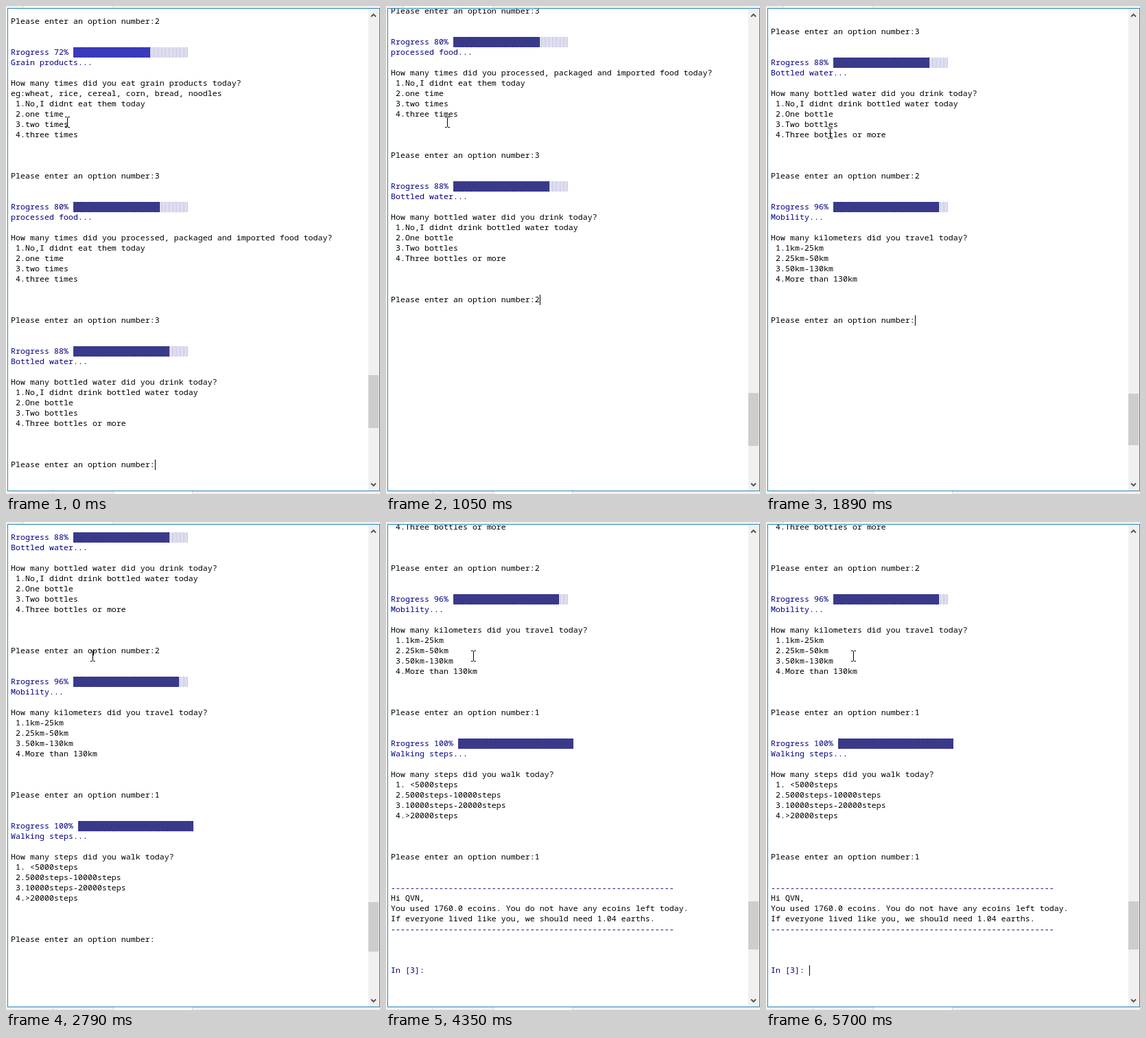
Animation, 545 px wide and 710 px high, one loop 5730 ms. Source, as an HTML page:

```html
<!DOCTYPE html>
<html lang="en">
<head>
<meta charset="utf-8">
<title>Console questionnaire</title>
<style>
@property --scroll { syntax: "<number>"; inherits: true; initial-value: 0; }
@property --total { syntax: "<number>"; inherits: true; initial-value: 6075; }
@property --stage { syntax: "<number>"; inherits: true; initial-value: 0; }
@property --line { syntax: "<number>"; inherits: true; initial-value: 43; }
@property --col { syntax: "<number>"; inherits: true; initial-value: 30; }

html, body { margin: 0; width: 100%; height: 100%; overflow: hidden; background: #f0f0f0; }

.stage {
  position: relative;
  width: 545px;
  height: 710px;
  overflow: hidden;
  animation: scroll 5730ms step-end infinite, session 5730ms step-end infinite;
}
.stage div, svg { position: absolute; }

/* Wheel steps of four lines */
@keyframes scroll {
  0% { --scroll: 0; }
  3.05% { --scroll: 60; }
  4.62% { --scroll: 120; }
  6.19% { --scroll: 180; }
  8.29% { --scroll: 240; }
  23.47% { --scroll: 300; }
  25.57% { --scroll: 360; }
  28.18% { --scroll: 420; }
  47.55% { --scroll: 480; }
  49.65% { --scroll: 540; }
  51.22%, 100% { --scroll: 600; }
}

/* Typed answers and the output that follows them */
@keyframes session {
  0% { --stage: 0; --line: 43; --col: 30; --total: 6075; }
  15.1% { --stage: 1; --line: 43; --col: 31; --total: 6075; }
  20.33% { --stage: 2; --line: 57; --col: 30; --total: 6285; }
  35% { --stage: 3; --line: 57; --col: 31; --total: 6285; }
  38.13% { --stage: 4; --line: 71; --col: 30; --total: 6495; }
  64.3% { --stage: 5; --line: 71; --col: 31; --total: 6495; }
  69.02%, 100% { --stage: 6; --line: 82; --col: 8; --total: 6660; }
}

@keyframes blink {
  0%, 15.1%, 32.37%, 56.6%, 84.7%, 100% { opacity: 1; }
  5.67%, 24%, 47.4%, 74.8% { opacity: 0; }
}

@keyframes pointer {
  0%, 21% { transform: translate(89px, 169px); }
  31%, 38% { transform: translate(93px, 185px); }
  47%, 49% { transform: translate(126px, 195px); }
  52%, 100% { transform: translate(127px, 195px); }
}

.frame {
  left: 2px;
  top: 3px;
  width: 541px;
  height: 701px;
  border: 1px solid #2d86b5;
  background: #fff;
}
.view { left: 3px; top: 4px; width: 525px; height: 701px; overflow: hidden; }
.doc { left: 4px; top: 10px; transform: translateY(calc(var(--scroll) * -1px)); }

pre {
  margin: 0;
  font: 11.667px/15px "Noto Sans Mono", "DejaVu Sans Mono", monospace;
  color: #000;
}
pre b { font-weight: normal; color: #000080; }
.step { opacity: clamp(0, var(--stage) - var(--at) + 1, 1); }

/* Shade characters: the same dot grid, dark on light and light on dark */
.bar, .bar::before {
  --mesh: conic-gradient(from 270deg at 1px 1px, var(--dot) 90deg, transparent 0);
  background: var(--mesh) 0 0 / 4px 2px, var(--mesh) 2px 1px / 4px 2px, var(--base);
  height: 15px;
}
.bar {
  --base: #fff;
  --dot: #8080c4;
  display: inline-block;
  position: relative;
  top: 1px;
  width: 168px;
  vertical-align: top;
}
.bar::before {
  --base: #22227c;
  --dot: #8080b8;
  content: "";
  position: absolute;
  width: calc(var(--n) * 7px);
}
.vivid::before { --base: #2222b0; --dot: #8080d8; }

.caret {
  left: calc(var(--col) * 7px);
  top: calc(var(--line) * 15px + 1px);
  width: 1px;
  height: 15px;
  background: #000;
  animation: blink 5730ms step-end infinite;
}

.track { left: 528px; top: 4px; width: 16px; height: 701px; background: #f0f0f0; }
.thumb {
  left: 528px;
  top: calc(22px + (4698 + var(--scroll)) * 666px / var(--total));
  width: 15px;
  height: calc(466200px / var(--total));
  background: #cdcdcd;
}
svg { left: 0; top: 0; fill: none; overflow: visible; }
.arrows { stroke: #505050; stroke-width: 1.8; }
.pointer { stroke: #000; animation: pointer 5730ms linear infinite; }

.tab { background: #fff; border: 0 solid #d4d4d4; }
.top { left: 25px; top: 0; width: 129px; height: 2px; border-width: 0 1px; }
.left { left: 68px; top: 707px; width: 1px; height: 3px; background: #d0d0d0; }
.bottom { left: 156px; top: 706px; width: 114px; height: 4px; border-width: 0 1px; }
</style>
</head>
<body>
<div class="stage">
<div class="tab top"></div>
<div class="frame"></div>
<div class="tab left"></div>
<div class="tab bottom"></div>
<div class="view"><div class="doc">
<pre>Please enter an option number:2


<b>Rrogress 72% <i class="bar vivid" style="--n:16"></i>
Grain products...</b>

How many times did you eat grain products today?
eg:wheat, rice, cereal, corn, bread, noodles
 1.No,I didnt eat them today
 2.one time
 3.two times
 4.three times



Please enter an option number:3


<b>Rrogress 80% <i class="bar" style="--n:18"></i>
processed food...</b>

How many times did you processed, packaged and imported food today?
 1.No,I didnt eat them today
 2.one time
 3.two times
 4.three times



Please enter an option number:3


<b>Rrogress 88% <i class="bar" style="--n:20"></i>
Bottled water...</b>

How many bottled water did you drink today?
 1.No,I didnt drink bottled water today
 2.One bottle
 3.Two bottles
 4.Three bottles or more



Please enter an option number:<span class="step" style="--at:1">2</span>


<span class="step" style="--at:2"><b>Rrogress 96% <i class="bar" style="--n:22"></i>
Mobility...</b>

How many kilometers did you travel today?
 1.1km-25km
 2.25km-50km
 3.50km-130km
 4.More than 130km



Please enter an option number:</span><span class="step" style="--at:3">1</span>


<span class="step" style="--at:4"><b>Rrogress 100% <i class="bar" style="--n:24"></i>
Walking steps...</b>

How many steps did you walk today?
 1. &lt;5000steps
 2.5000steps-10000steps
 3.10000steps-20000steps
 4.&gt;20000steps



Please enter an option number:</span><span class="step" style="--at:5">1</span>


<span class="step" style="--at:6"><b>-----------------------------------------------------------</b>
Hi QVN,
You used 1760.0 ecoins. You do not have any ecoins left today.
If everyone lived like you, we should need 1.04 earths.
<b>-----------------------------------------------------------</b>



<b>In [3]:</b></span></pre>
<div class="caret"></div>
</div></div>
<div class="track"></div>
<div class="thumb"></div>
<svg class="arrows" width="545" height="710"><path d="M532 15.5l3.5-3.5 3.5 3.5M532 694.5l3.5 3.5 3.5-3.5"/></svg>
<svg class="pointer" width="1" height="1"><path d="M.5-6.5v13M-3-7.5h2.5l1 1 1-1H4M-3 7.5h2.5l1-1 1 1H4"/></svg>
</div>
</body>
</html>
```
